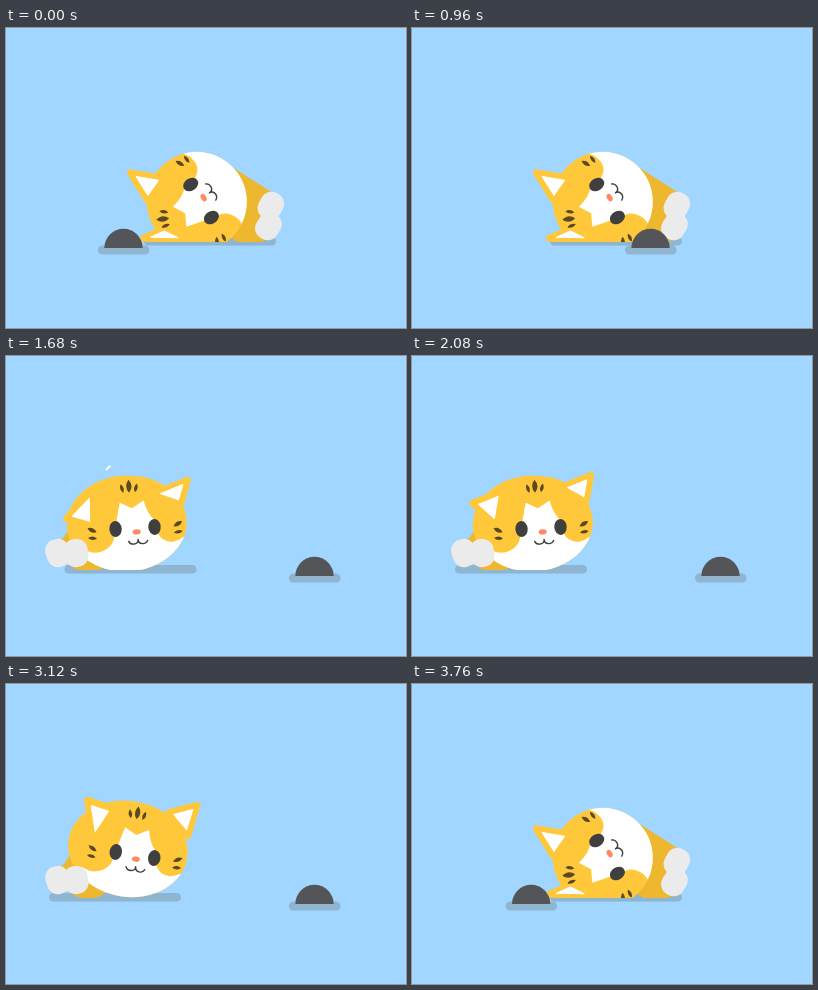
These frames come from a looping animation (400 px wide and 300 px high, 3840 ms). An HTML page with a canvas:

```html
<!DOCTYPE html>
<html lang="en">
<head>
<meta charset="utf-8">
<title>Rolling kitten</title>
<style>
html, body { margin: 0; width: 100%; height: 100%; overflow: hidden; background: #a0d6ff; }
canvas { display: block; width: 400px; height: 300px; }
</style>
</head>
<body>
<canvas id="stage" width="400" height="300"></canvas>
<script>
const ctx = document.getElementById('stage').getContext('2d');
const LOOP = 3840, STEP = 80, GROUND = 214;
const FUR = '#ffc83a', FUR_DARK = '#edb72f', DARK = '#3f3f40', STRIPE = '#5a4a24';
const SHADOW = 'rgba(100,100,95,.29)';
const RAD = Math.PI / 180;

const mix = (a, b, k) => a + (b - a) * k;
const mixPoints = (p, q, k) => p.map((v, i) => mix(v, q[i], k));
const clamp = v => Math.max(0, Math.min(1, v));
const sine = u => (1 - Math.cos(Math.PI * u)) / 2;
const quad = u => u < .5 ? 2 * u * u : 1 - 2 * (1 - u) ** 2;
const cubic = u => u < .5 ? 4 * u ** 3 : 1 - 4 * (1 - u) ** 3;
const cubicOut = u => 1 - (1 - u) ** 3;
const ramp = (t, start, length, ease = sine) => ease(clamp((t - start) / length));

// Inner ear: outer base, inner base and tip, measured from between the eyes.
const LEFT_EAR = {
  rest: [-19, -39, -6, -47, -4, -62],
  flung: [-36, -38, -21, -50, -41, -60],
  droop: [-45, -9, -44, -32, -62, -15],
  raised: [-47, -14, -39, -35, -60, -37],
  alert: [-43, -17, -33, -39, -51, -42]
};
const RIGHT_EAR = {
  rest: [40, -25, 33, -42, 55, -42],
  flung: [46, -34, 33, -46, 50, -55],
  droop: [45, -26, 27, -33, 50, -41],
  raised: [44, -32, 30, -44, 47, -50],
  alert: [47, -33, 32, -46, 50, -54]
};

function ellipse(x, y, rx, ry, color, angle = 0) {
  ctx.beginPath();
  ctx.ellipse(x, y, rx, ry, angle * RAD, 0, 7);
  ctx.fillStyle = color;
  ctx.fill();
}

function bar(x, y, w, h) {
  ctx.beginPath();
  ctx.roundRect(x, y, w, h, h / 2);
  ctx.fillStyle = SHADOW;
  ctx.fill();
}

function leaf(x, y, length, width, angle) {
  ctx.save();
  ctx.translate(x, y);
  ctx.rotate(angle * RAD);
  ctx.beginPath();
  ctx.moveTo(-length / 2, 0);
  ctx.quadraticCurveTo(0, -width, length / 2, 0);
  ctx.quadraticCurveTo(0, width, -length / 2, 0);
  ctx.fillStyle = STRIPE;
  ctx.fill();
  ctx.restore();
}

function triangle(p, color, round) {
  ctx.beginPath();
  ctx.moveTo(p[0], p[1]);
  ctx.lineTo(p[4], p[5]);
  ctx.lineTo(p[2], p[3]);
  ctx.closePath();
  ctx.fillStyle = ctx.strokeStyle = color;
  ctx.lineWidth = round;
  ctx.lineJoin = 'round';
  ctx.fill();
  ctx.stroke();
}

function ear(poses, s) {
  const flying = mixPoints(poses.rest, poses.flung, clamp(s.roll / .42));
  const upright = mixPoints(mixPoints(poses.droop, poses.raised, s.rise), poses.alert, s.perk);
  const p = mixPoints(flying, upright, clamp((s.roll - .42) / .58));
  const cx = (p[0] + p[2] + p[4]) / 3;
  const cy = (p[1] + p[3] + p[5]) / 3;
  triangle(p.map((v, i) => mix(i % 2 ? cy : cx, v, 1.5)), FUR, 7);
  triangle(p, '#fff', 1);
}

function face() {
  ctx.beginPath();
  ctx.moveTo(-14, -26);
  ctx.lineTo(-2, -20);
  ctx.lineTo(10, -27);
  ctx.quadraticCurveTo(13, -13, 20, -7);
  ctx.lineTo(22, 6);
  ctx.quadraticCurveTo(28, 18, 40, 15);
  ctx.quadraticCurveTo(48, 13, 54, 6);
  ctx.lineTo(62, 62);
  ctx.lineTo(-50, 62);
  ctx.lineTo(-50, 20);
  ctx.quadraticCurveTo(-43, 24, -35, 22);
  ctx.quadraticCurveTo(-22, 18, -21, 6);
  ctx.quadraticCurveTo(-18, -10, -14, -26);
  ctx.fillStyle = '#fff';
  ctx.fill();
}

function stripes(s) {
  for (const side of [-1, 1]) {
    const y = side < 0 ? mix(-6, 2, s.roll) : mix(4, 0, s.roll);
    leaf(side * 43, y - 2, 10, 4, side * -28);
    leaf(side * 43, y + 6, 9, 3.5, side * -6);
  }
  ctx.save();
  ctx.translate(mix(5, -4, s.roll), -42);
  ctx.rotate(25 * RAD * (1 - s.roll));
  leaf(0, 0, 13, 5.5, 90);
  leaf(-7, 2, 9, 3.5, 75);
  leaf(7, 2, 9, 3.5, 105);
  ctx.restore();
}

function head(s) {
  ctx.save();
  ctx.translate(s.x, s.y);
  ctx.rotate(s.angle * RAD);

  ctx.save();
  const wide = s.roll ** 3;
  ellipse(mix(1.5, -8, wide), mix(-4, -5, wide), mix(50, 60, wide), mix(50, 48, wide), FUR);
  ctx.clip();
  face();
  ctx.restore();

  ear(LEFT_EAR, s);
  ear(RIGHT_EAR, s);
  stripes(s);
  for (const side of [-1, 1]) ellipse(side * 19.5, 0, 6.2, 8, DARK);

  ellipse(1.5, 4, 4, 2.6, '#ff8964');
  ctx.beginPath();
  ctx.moveTo(-7, 13);
  ctx.bezierCurveTo(-5, 17.5, 2.5, 17, 2.5, 11.5);
  ctx.bezierCurveTo(2.5, 17, 10, 17.5, 12, 13);
  ctx.strokeStyle = DARK;
  ctx.lineWidth = 1.4;
  ctx.lineCap = 'round';
  ctx.stroke();
  ctx.restore();
}

function polar(s, angle, radius) {
  return [s.x + radius * Math.cos(angle * RAD), s.y + radius * Math.sin(angle * RAD)];
}

// Returns the hip position, the direction of the leg and its length.
function makeLeg(s, angle, radius, lead, hipRadius) {
  const [px, py] = polar(s, angle, radius);
  const [x, y] = polar(s, angle - lead, hipRadius);
  return { x, y, dir: Math.atan2(py - y, px - x), length: Math.hypot(px - x, py - y) };
}

function onLeg(leg, paint) {
  ctx.save();
  ctx.translate(leg.x, leg.y);
  ctx.rotate(leg.dir);
  ctx.beginPath();
  paint(leg.length);
  ctx.fill();
  ctx.restore();
}

function limb(leg) {
  ctx.fillStyle = FUR_DARK;
  onLeg(leg, length => {
    ctx.moveTo(0, -16);
    ctx.lineTo(length, -12);
    ctx.lineTo(length, 12);
    ctx.lineTo(0, 16);
  });
}

function paw(leg) {
  ctx.fillStyle = '#ebebeb';
  onLeg(leg, length => ctx.roundRect(length - 12, -14, 24, 28, 11));
}

function cat(s) {
  ctx.save();
  ctx.beginPath();
  ctx.rect(0, 0, 400, GROUND);
  ctx.clip();
  ellipse(s.x + mix(49, -47, s.roll), s.y + 19, 26, 25, FUR_DARK);
  const bump = Math.sin(Math.PI * s.roll);
  const legs = [
    makeLeg(s, mix(20.5, -203, s.late), mix(72, 64, s.late) + 26 * Math.sin(Math.PI * s.late), 9, 40),
    makeLeg(s, mix(4, -198, s.early), mix(70, 81, s.roll) - 13 * bump,
      50 * Math.cos(Math.PI / 2 * s.roll ** 3), mix(30, 44, bump))
  ];
  legs.forEach(limb);
  head(s);
  legs.forEach(paw);
  ctx.restore();
}

function swoosh(s, t, start, back) {
  const k = t - start;
  if (k < 70 || k > 410) return;
  let tip = k < 150 ? mix(-30, -160, clamp((k - 50) / 100)) : mix(-160, -136, (k - 150) / 240);
  let tail = mix(-39, -131, clamp((k - 150) / 240));
  if (tip >= tail) return;
  if (back) [tip, tail] = [-180 - tip, -180 - tail];
  ctx.beginPath();
  ctx.arc(s.x + (back ? -14 : 28.5), s.y - 1, back ? 84 : mix(76, 81, clamp((k - 150) / 240)),
    tail * RAD, tip * RAD, !back);
  ctx.setLineDash([6, 8, 34, 10, 100]);
  ctx.strokeStyle = '#fff';
  ctx.lineWidth = 2;
  ctx.lineCap = 'butt';
  ctx.stroke();
  ctx.setLineDash([]);
}

function ball(t) {
  const u = (t - 2240) / 480;
  if (u <= 0 || u >= 1) return;
  const lift = Math.sin(Math.PI * u);
  ellipse(283 - 7 * lift, 212 - 18 * lift, 7, 7, '#f5f9fc');
}

function dome(t) {
  const x = 117.5 + 137.5 * ramp(t, 250, 916) + 53.5 * ramp(t, 1285, 235, cubicOut)
    - 191 * ramp(t, 3325, 500, cubic);
  bar(x - 25.5, 217.5, 51.5, 9);
  ctx.beginPath();
  ctx.arc(x, 220, 19.2, Math.PI, 0);
  ctx.fillStyle = '#545558';
  ctx.fill();
}

function draw(t) {
  const roll = ramp(t, 1290, 336) - ramp(t, 3160, 380);
  const perk = ramp(t, 2640, 340);
  const s = {
    roll, perk,
    early: ramp(t, 1280, 336) - ramp(t, 3180, 380),
    late: ramp(t, 1355, 310) - ramp(t, 3160, 340),
    rise: ramp(t, 1880, 380),
    x: mix(195, 129, roll ** 1.2),
    y: mix(173, 172, roll) - 13.5 * Math.sin(Math.PI * roll) - perk * roll,
    angle: mix(-122, -363 + 12 * perk, roll)
  };
  ctx.fillStyle = '#a0d6ff';
  ctx.fillRect(0, 0, 400, 300);
  bar(138 - 95 * (ramp(t, 1330, 490, quad) - ramp(t, 3200, 440, quad)), 209, 132, 8.5);
  swoosh(s, t, 1290, false);
  swoosh(s, t, 3160, true);
  cat(s);
  ball(t);
  dome(t);
}

const began = performance.now();
function tick() {
  const t = (performance.now() - began) % LOOP;
  draw(Math.floor(t / STEP) * STEP);
  requestAnimationFrame(tick);
}
tick();
</script>
</body>
</html>
```
